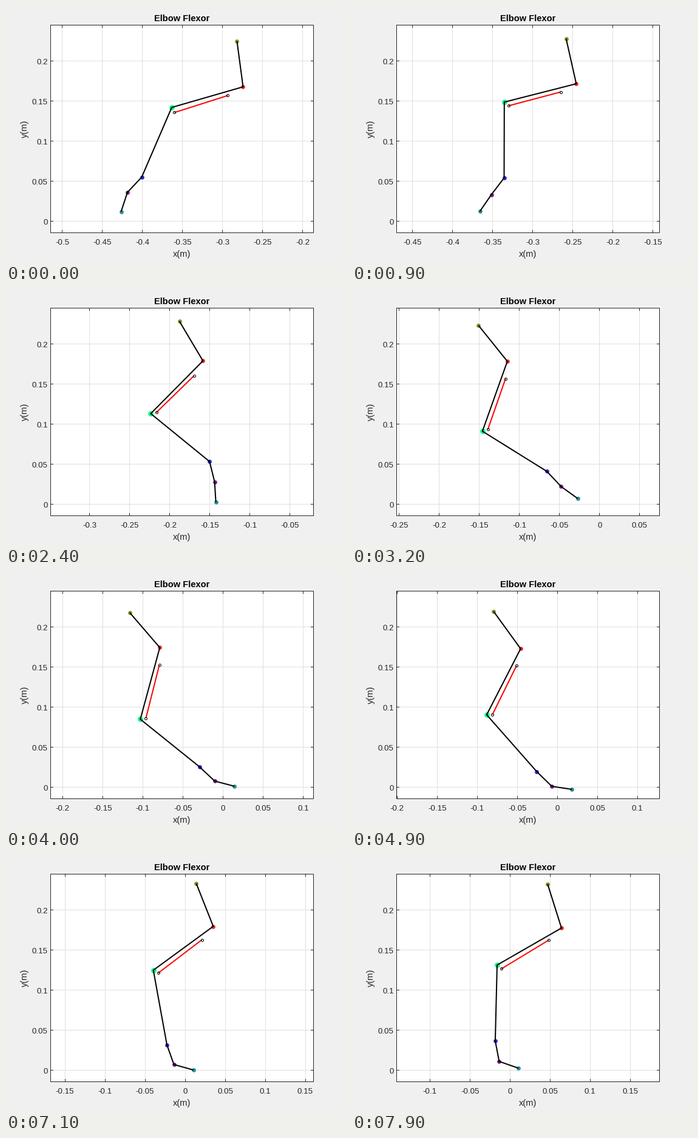
Write a matplotlib script that moves like this. It is 560 by 420 pixels and loops after 8000 ms.

```python
import numpy as np
import matplotlib.pyplot as plt
from matplotlib.animation import FuncAnimation

W, H, DPI = 560, 420, 100
PT = 72 / DPI                      # points per pixel
LEFT, RIGHT, TOP, BOTTOM = 73.5, 506.5, 31.5, 373.5
MID = 290
STEP = 66                          # pixels per 0.05 m
GROUND = 354.5
TICK = 4.5
HOLD = 4                           # extra frames on the first pose
INK, GRID = "#262626", "#dfdfdf"

# Pose keys: position of the top joint and angle of each bone (degrees, y down)
KEYS = np.array([0, 12, 28, 36, 45, 59, 75], float)
TOP_X = [-372, -297.5, -199.5, -153.5, -105, -26, 62]
TOP_Y = [58, 51, 60, 67, 65, 50, 48]
ANGLES = [
    [82.4, 69.5, 51.2, 49.3, 54.1, 63.8, 72.5],
    [163.9, 159.9, 109.6, 105.2, 117.2, 136.2, 150.1],
    [113.3, 61.4, 31.9, 38.8, 48.6, 67.9, 91.4],
    [133.2, 111.3, 46.8, 43.2, 44.4, 60.5, 79.2],
    [108.2, 127.7, 35.8, 14.7, 8.6, 12.0, 19.2],
]
BONES = [75.8, 122.3, 125, 34.4, 33.5]


def spline(values):
    """Natural cubic spline through the pose keys."""
    y, h = np.array(values, float), np.diff(KEYS)
    n = len(y)
    a, b = np.eye(n), np.zeros(n)
    for i in range(1, n - 1):
        a[i, i - 1:i + 2] = h[i - 1], 2 * (h[i - 1] + h[i]), h[i]
        b[i] = 6 * ((y[i + 1] - y[i]) / h[i] - (y[i] - y[i - 1]) / h[i - 1])
    m = np.linalg.solve(a, b)

    def at(t):
        i = min(max(np.searchsorted(KEYS, t) - 1, 0), n - 2)
        p, q = (KEYS[i + 1] - t) / h[i], (t - KEYS[i]) / h[i]
        bend = (p**3 - p) * m[i] + (q**3 - q) * m[i + 1]
        return p * y[i] + q * y[i + 1] + bend * h[i]**2 / 6
    return at


base_x, base_y = spline(TOP_X), spline(TOP_Y)
bone_angles = [spline(a) for a in ANGLES]


def pose(t):
    """Joint positions and muscle ends in pixels, x measured from x = 0 m."""
    joints = [np.array([base_x(t), base_y(t)])]
    dirs = []
    for angle, size in zip(bone_angles, BONES):
        r = np.radians(angle(t))
        dirs.append(np.array([np.cos(r), np.sin(r)]))
        joints.append(joints[-1] + size * dirs[-1])

    def attach(joint, d, along, side):
        return joint + along * d + side * np.array([d[1], -d[0]])

    muscle = [attach(joints[1], dirs[1], 28, 6.8),
              attach(joints[2], dirs[2], 6, 7.3)]
    return np.array(joints), np.array(muscle)


fig = plt.figure(figsize=(W / DPI, H / DPI), dpi=DPI, facecolor="#f0f0f0")
ax = fig.add_axes([0, 0, 1, 1])
ax.set_xlim(0, W)
ax.set_ylim(H, 0)
ax.axis("off")


def line(xs=(), ys=(), color=INK, width=1, z=1, **kw):
    return ax.plot(xs, ys, color=color, lw=width * PT, zorder=z, snap=False,
                   solid_capstyle="butt", **kw)[0]


def dot(color, size, z=4, **kw):
    return ax.plot([], [], "o", color=color, ms=size * PT, zorder=z, **kw)[0]


def text(x, y, s, size=13.33, color=INK, ha="center", va="baseline", **kw):
    return ax.text(x, y, s, fontsize=size * PT, color=color, ha=ha, va=va,
                   family="Liberation Sans", **kw)


def tick_name(k):
    return f"{round(k * 0.05, 2):g}"


# Fixed parts of the plot
ax.add_patch(plt.Rectangle((LEFT, TOP), RIGHT - LEFT, BOTTOM - TOP,
                           fc="white", ec="none", zorder=0))
for k in range(5):
    y = GROUND - k * STEP
    line([LEFT, RIGHT], [y, y], GRID)
    line([LEFT, LEFT + TICK], [y, y], z=3)
    line([RIGHT - TICK, RIGHT], [y, y], z=3)
    text(68.7, y + 5.5, tick_name(k), ha="right")
line([LEFT, RIGHT, RIGHT, LEFT, LEFT], [TOP, TOP, BOTTOM, BOTTOM, TOP], z=3,
     solid_joinstyle="miter")
text(MID, 25, "Elbow Flexor", 14.67, "black", weight="bold")
text(MID, 412.8, "x(m)", 14.67)
text(38, 202, "y(m)", 14.67, ha="right", va="center", rotation=90)

# Moving parts
ticks = [(line(color=GRID), line(z=3), line(z=3), text(0, 392.8, ""))
         for _ in range(7)]
dots = [dot(c, 6.8, mew=0) for c in
        ("#8c8c26", "#f02a2a", "#2a2ad8", "#7a2080", "#2a9090")]
elbow = [dot("#1affa6", 9, mew=0), dot("#1aff50", 5, mew=0)]
limb = line(color="black", width=2, z=5, solid_joinstyle="round")
flexor = line(color="red", width=2, z=5)
ends = dot("black", 4, 6, mfc="none", mew=PT)


def draw(frame):
    t = max(0, frame - HOLD)
    joints, muscle = pose(t)
    xs = joints[:, 0]
    zero = MID - (min(xs.min(), xs[2] - 4) + xs.max()) / 2
    joints[:, 0] += zero
    muscle[:, 0] += zero

    first = int(np.ceil((LEFT - zero) / STEP))
    for k, (grid, low, high, label) in enumerate(ticks, first):
        x = zero + k * STEP
        shown = x <= RIGHT
        col = np.floor(x) + 0.5
        for part, y0, y1 in ((grid, TOP, BOTTOM), (low, BOTTOM - TICK, BOTTOM),
                             (high, TOP, TOP + TICK)):
            part.set_data([col, col], [y0, y1])
            part.set_visible(shown)
        label.set_x(x)
        label.set_text(tick_name(k) if shown else "")

    for mark, j in zip(dots + elbow, (0, 1, 3, 4, 5, 2, 2)):
        mark.set_data(joints[j:j + 1].T)
    limb.set_data(joints.T)
    flexor.set_data(muscle.T)
    ends.set_data(muscle.T)
    return []


anim = FuncAnimation(fig, draw, frames=80, init_func=lambda: draw(0),
                     interval=100, repeat=True, repeat_delay=0, blit=False)
plt.show()
```
